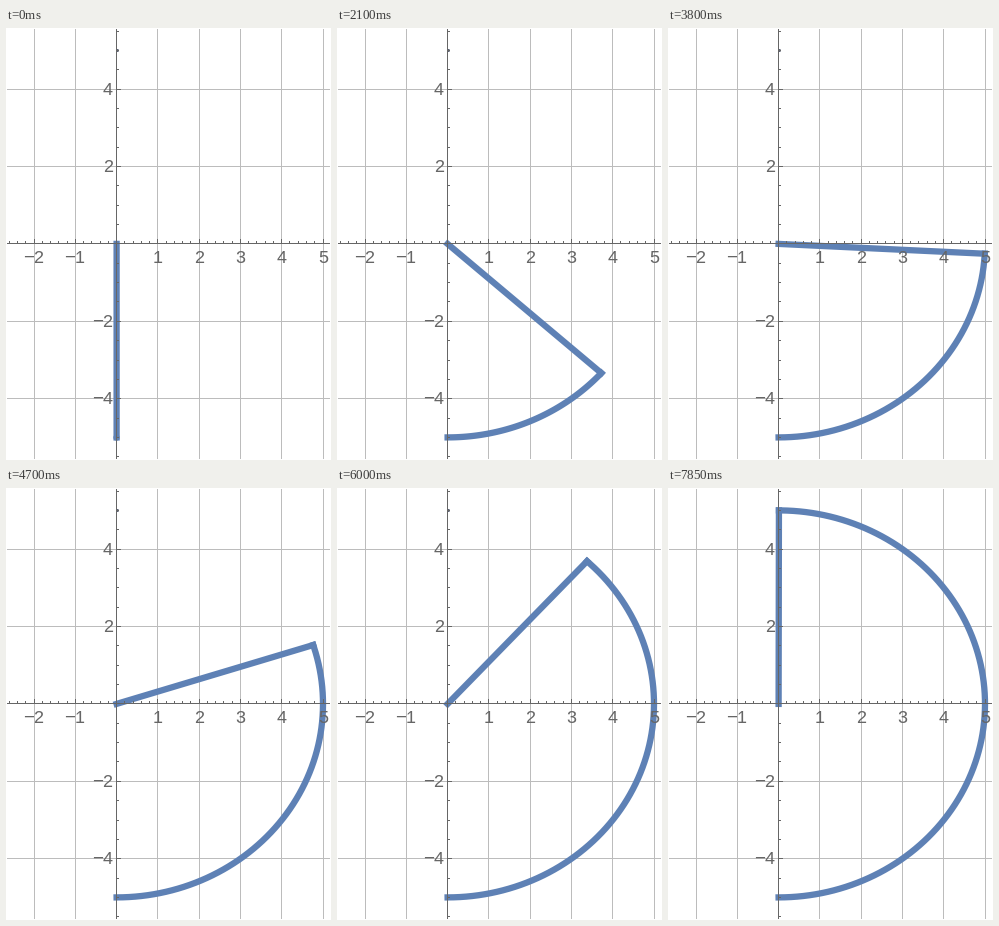
A matplotlib script for the animation above (7.9 s loop, 325x432 px).

```python
import numpy as np
import matplotlib.pyplot as plt
from matplotlib.animation import FuncAnimation

plt.rcParams.update({"text.hinting": "native", "text.hinting_factor": 1})

W, H = 325, 432
PX = 0.72                      # points per pixel at 100 dpi
FRAMES, INTERVAL = 158, 50
STEP = 0.02                    # radians per frame
RADIUS = 5
BLUE, GRID, AXIS = "#5e81b5", "#bcbcbc", "#666666"


def px(x):
    return 110.6 + 41.28 * np.asarray(x)


def py(y):
    return 215.9 - 38.7 * np.asarray(y)


def crisp(v):
    """Centre of the pixel that holds v."""
    return np.floor(v) + 0.5


fig = plt.figure(figsize=(W / 100, H / 100), dpi=100, facecolor="white")
ax = fig.add_axes([0, 0, 1, 1])
ax.set(xlim=(0, W), ylim=(H, 0))
ax.axis("off")


def stroke(xs, ys, color, z):
    ax.plot(xs, ys, color=color, lw=PX, solid_capstyle="butt", zorder=z,
            snap=False)


def label(x, y, n, ha):
    ax.text(x, y, str(n).replace("-", "\u2212"), ha=ha, va="baseline",
            family="Liberation Sans", size=18 * PX, color=AXIS, zorder=5)


x0, y0 = crisp(px(0)), crisp(py(0))

# Grid, axes and labels
for n in (-2, -1, 1, 2, 3, 4, 5):
    x = crisp(px(n))
    stroke([x, x], [1, 431], GRID, 1)
    label(px(n) - (0.7 if n < 0 else 0), 235.3, n, "center")
for n in (-4, -2, 2, 4):
    y = crisp(py(n))
    stroke([1, 324], [y, y], GRID, 1)
    label(107, py(n) + 5.6, n, "right")

stroke([1, 324], [y0, y0], AXIS, 4)
stroke([x0, x0], [1, 431], AXIS, 4)
for i in range(-13, 26):
    x = crisp(px(i / 5))
    stroke([x, x], [y0, y0 - (4.5 if i % 5 == 0 else 2.5)], AXIS, 4)
for i in range(-11, 12):
    y = crisp(py(i / 2))
    stroke([x0, x0 + (4.5 if i % 4 == 0 else 2.5)], [y, y], AXIS, 4)

ax.plot(px(0), py(RADIUS), "o", ms=3 * PX, mew=0, color="#555c70", zorder=2,
        snap=False)

# Moving radius and the arc it traces
pen = dict(color=BLUE, lw=6.3 * PX, solid_capstyle="projecting", zorder=3,
           snap=False)
arc, = ax.plot([], [], solid_joinstyle="round", **pen)
arm, = ax.plot([], [], **pen)
start, = ax.plot(px(0) - 0.7, py(-RADIUS), "o", ms=6.3 * PX, mew=0,
                 color=BLUE, zorder=3, snap=False)


def update(i):
    t = np.linspace(0, STEP * i, max(2, 2 * i))
    xs, ys = px(RADIUS * np.sin(t)), py(-RADIUS * np.cos(t))
    arc.set_data(xs, ys)
    arm.set_data([px(0), xs[-1]], [py(0), ys[-1]])
    start.set_visible(i == 0)
    return arc, arm, start


anim = FuncAnimation(fig, update, frames=FRAMES, interval=INTERVAL,
                     repeat=True, repeat_delay=0, blit=False)
plt.show()
```
